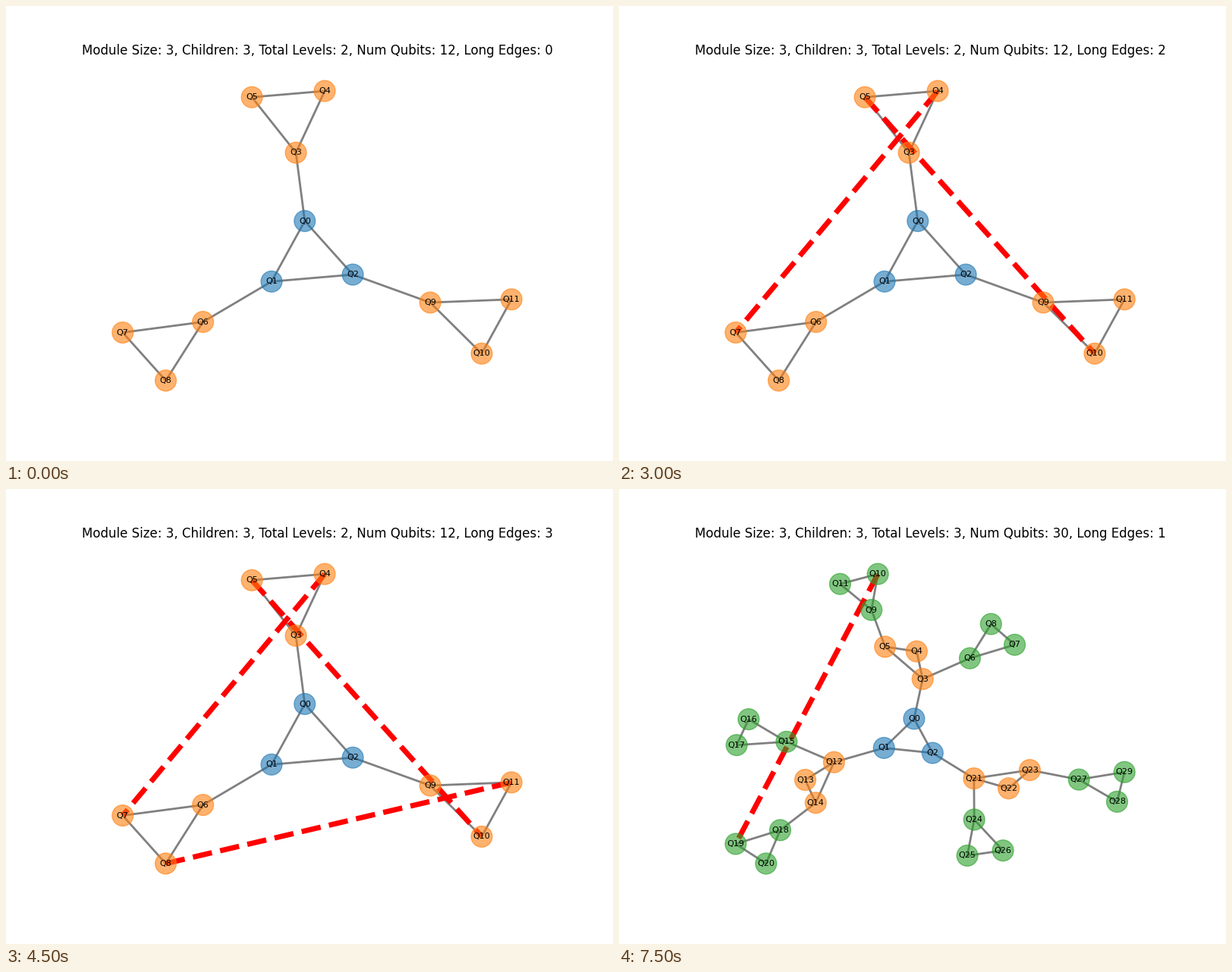
Animation of 800x600 px, one loop 8 s. Source, as a matplotlib script:

```python
import matplotlib.pyplot as plt
import numpy as np
from matplotlib.animation import FuncAnimation
from matplotlib.collections import LineCollection

STEP = 500   # ms per frame
HOLD = 3     # frames per scene
SIZE = 3     # nodes per module
COLORS = ["tab:blue", "tab:orange", "tab:green"]


def turn(deg):
    return np.exp(1j * np.radians(deg))


def grow_tree(levels):
    """Rough positions (complex), edges and depth of a tree of triangles."""
    pos, edges, depths = [], [], []

    def grow(corners, children, depth):
        first = len(pos)
        pos.extend(corners)
        depths.extend([depth] * SIZE)
        edges.extend((first + a, first + b) for a, b in ((0, 1), (0, 2), (1, 2)))
        if depth + 1 == levels:
            return
        for k, heading in children:
            edges.append((first + k, len(pos)))
            base = corners[k] + turn(heading)
            # Modules with children of their own lean to the left.
            lean = 30 if depth + 2 < levels else 0
            arms = [base + turn(heading + lean + side) for side in (-30, 30)]
            grow([base] + arms, [(0, heading - 60), (2, heading + 30)], depth + 1)

    spokes = [90 + 120 * k for k in range(SIZE)]
    grow([0.58 * turn(s) for s in spokes], list(enumerate(spokes)), 0)
    return np.array(pos), edges, depths


def relax(z, edges, rounds=1500):
    """Move nodes until their distances fit the hop counts (stress layout)."""
    n = len(z)
    hops = np.full((n, n), np.inf)
    np.fill_diagonal(hops, 0)
    for a, b in edges:
        hops[a, b] = hops[b, a] = 1
    for k in range(n):
        hops = np.minimum(hops, hops[:, [k]] + hops[k])
    np.fill_diagonal(hops, np.inf)
    weight = hops ** -2
    solve = np.linalg.pinv(np.diag(weight.sum(1)) - weight)
    for _ in range(rounds):
        diff = z[:, None] - z
        z = solve @ (diff / (abs(diff) + np.eye(n)) / hops).sum(1)
    return z


class Graph:
    def __init__(self, levels, long, angle):
        z, self.edges, depths = grow_tree(levels)
        z = relax(z, self.edges)
        z -= z[:SIZE].mean()
        # Turn the whole layout so the first long edge starts at this angle.
        anchor = z[long[0][0]]
        z *= turn(angle) * abs(anchor) / anchor
        self.pos = np.column_stack([z.real, z.imag])
        self.colors = [COLORS[d] for d in depths]
        self.levels, self.long = levels, long


small = Graph(2, [(4, 7), (5, 10), (8, 11)], 85.86)
large = Graph(3, [(10, 19)], 98.36)

# Each scene is a graph and its number of long edges.
scenes = [(small, n) for n in range(4)] + [(large, n) for n in range(2)]

fig, ax = plt.subplots(figsize=(8, 6), dpi=100)


def add_edges(pos, edges, **style):
    lines = LineCollection(pos[np.array(edges)], zorder=1, **style)
    ax.add_collection(lines, autolim=False)


def draw(frame):
    graph, shown = scenes[frame // HOLD]
    pos = graph.pos
    ax.clear()
    ax.axis("off")
    ax.margins(0.105)

    ax.scatter(*pos.T, s=400, c=graph.colors, alpha=0.6, zorder=2)
    add_edges(pos, graph.edges, colors="gray", linewidths=2)
    if shown:
        add_edges(pos, graph.long[:shown], colors="red",
                  linewidths=5, linestyles="dashed")
    for i, (x, y) in enumerate(pos):
        ax.text(x, y, f"Q{i}", size=8, ha="center", va="center")

    ax.set_title(f"Module Size: {SIZE}, Children: 3, Total Levels: {graph.levels}, "
                 f"Num Qubits: {len(pos)}, Long Edges: {shown}")


anim = FuncAnimation(fig, draw, frames=8000 // STEP, interval=STEP,
                     repeat=True, repeat_delay=0)
plt.show()
```
